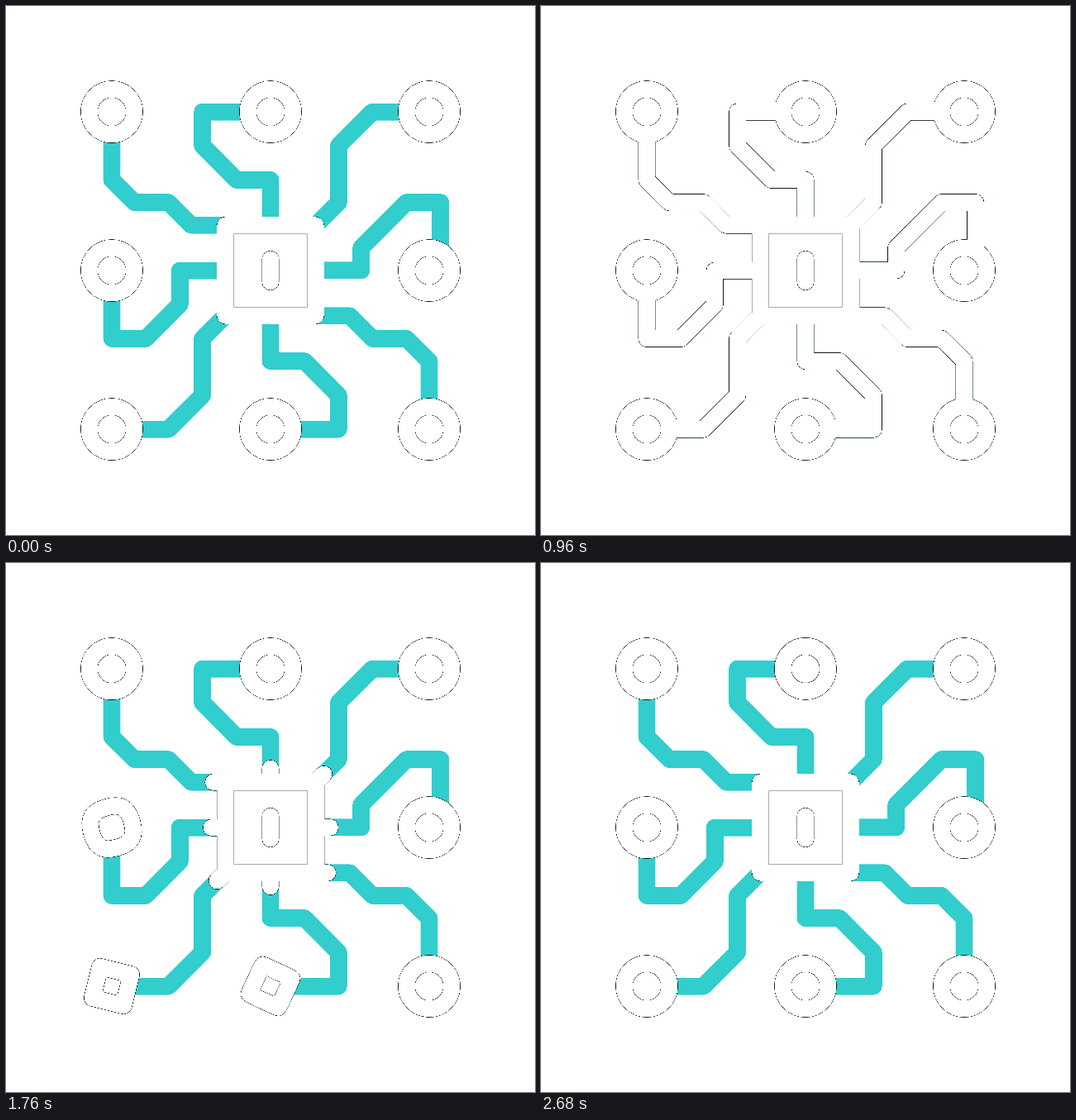
Write an HTML page that moves like this. It is 640x640 px and loops after 3.02 s.

```html
<!DOCTYPE html>
<html lang="en">
<head>
<meta charset="utf-8">
<title>Circuit</title>
<style>
  html, body { margin: 0; width: 100%; height: 100%; overflow: hidden; background: #fff; }
  svg { display: block; width: 100vw; height: 100vh; }
</style>
</head>
<body>
<svg viewBox="0 0 640 640">
  <defs>
    <!-- solid white body with a thin dark edge where coverage is partial -->
    <filter id="edge" filterUnits="userSpaceOnUse" x="0" y="0" width="640" height="640" color-interpolation-filters="sRGB">
      <feComponentTransfer in="SourceGraphic" result="body">
        <feFuncA type="linear" slope="5" intercept="-2"/>
      </feComponentTransfer>
      <feComponentTransfer in="SourceAlpha" result="rim">
        <feFuncA type="table" tableValues="0 .35 .6 .8 .9 .9 .7 0 0 0 0"/>
      </feComponentTransfer>
      <feMerge>
        <feMergeNode in="body"/>
        <feMergeNode in="rim"/>
      </feMerge>
    </filter>
    <filter id="crisp" filterUnits="userSpaceOnUse" x="0" y="0" width="640" height="640" color-interpolation-filters="sRGB">
      <feComponentTransfer>
        <feFuncA type="linear" slope="2.5"/>
      </feComponentTransfer>
    </filter>
  </defs>
  <g fill="none" stroke-linejoin="round">
    <g id="wires" stroke="#32cdcd" stroke-width="20.25" filter="url(#crisp)"/>
    <g id="lines" stroke="#fff" stroke-width="20.25" stroke-linecap="round" filter="url(#edge)"/>
    <path id="sides" d="M255.5 275V310M255.5 330V371M385.5 269V310M385.5 330V365" stroke="#aaa"/>
    <rect x="275.5" y="275.5" width="89" height="89" stroke="#aaa"/>
  </g>
</svg>
<script>
const LOOP = 3020, STEP = 20, MID = 320, U = 192 / 7;
const $ = id => document.getElementById(id);

function add(parent, d) {
  const p = document.createElementNS('http://www.w3.org/2000/svg', 'path');
  p.setAttribute('d', d);
  parent.appendChild(p);
  return p;
}

const at = v => MID + v * U;

// Follows compass steps such as "S2 SE1"; turn = -1 gives the half-turned copy
function route(x, y, steps, turn = 1) {
  let d = `M${at(x * turn)} ${at(y * turn)}`;
  for (const step of steps.split(' ')) {
    const [, dir, n] = step.match(/([NSEW]+)(.+)/);
    x += n * (dir.includes('E') - dir.includes('W'));
    y += n * (dir.includes('S') - dir.includes('N'));
    d += `L${at(x * turn)} ${at(y * turn)}`;
  }
  return d;
}

const paired = [
  [-7, -6, 'S2 SE1 E1.5 SE1 E1.5'],
  [-1, -7, 'W2 S1.5 SE1.5 E1.5 S2'],
  [6, -7, 'W1.5 SW1.5 S2.5 SW1']
];
const routes = [
  ...paired.flatMap(r => [route(...r), route(...r, -1)]),
  route(-7, 1, 'S2 E1.5 NE1.5 N1.5 E2'),
  route(7.5, -Math.sqrt(.75), 'N2.134 W1.5 SW2 S1 W2')
];

const pulses = routes.map(d => {
  add($('wires'), d);
  const el = add($('lines'), d);
  return { el, len: el.getTotalLength() };
});

add($('lines'), route(-2, -2, 'E4 S4 W4 N4') + 'Z').setAttribute('stroke-width', 19.72);
add($('lines'), route(0, -.5, 'S1'));

// Eight nodes, anticlockwise from the top left, spinning one after another
const nodes = Array.from({ length: 8 }, (_, i) => {
  const a = (5 - i) * Math.PI / 4;
  return {
    el: add($('lines'), ''),
    x: at(7 * Math.round(Math.cos(a))),
    y: at(7 * Math.round(Math.sin(a))),
    mid: 1493 + 125 * i
  };
});

// Four corners on a circle; round = 1 gives the circle, 0 the square
function blob(round) {
  const c = U * Math.SQRT1_2, q = c * .5523 * round;
  let d = `M${-c} ${-c}`;
  let side = [[-c + q, -c - q], [c - q, -c - q], [c, -c]];
  for (let i = 0; i < 4; i++) {
    d += 'C' + side.map(p => p.join(' ')).join(' ');
    side = side.map(([x, y]) => [-y, x]);
  }
  return d + 'Z';
}

const clamp = v => Math.max(0, Math.min(1, v));
const span = (t, a, b) => clamp((t - a) / (b - a));
const smooth = v => v * v * (3 - 2 * v);

// Timing curve with control points (a, 0) and (b, 1)
function ease(x, a, b) {
  if (x <= 0 || x >= 1) return x;
  let lo = 0, hi = 1;
  for (let i = 0; i < 24; i++) {
    const s = (lo + hi) / 2, r = 1 - s;
    if (3 * a * s * r * r + 3 * b * s * s * r + s * s * s < x) lo = s; else hi = s;
  }
  return smooth(lo);
}

function draw(t) {
  const head = ease(span(t, 360, 938), .6, .4);
  const tail = ease(span(t, 898, 2306), .2, 0);
  const live = head > 0 && tail < 1;
  for (const { el, len } of pulses) {
    el.style.display = live ? '' : 'none';
    el.setAttribute('stroke-dasharray', `${len * (head - tail)} ${len * 2}`);
    el.setAttribute('stroke-dashoffset', -len * tail);
  }
  $('sides').style.display = live && head === 1 ? '' : 'none';

  for (const { el, x, y, mid } of nodes) {
    const dt = t - mid;
    const square = smooth(span(dt, -230, -95)) - smooth(span(dt, 30, 200));
    const angle = 180 * ease(span(dt, -310, 310), .65, .35);
    el.setAttribute('d', blob(1 - square));
    el.setAttribute('transform', `translate(${x} ${y}) rotate(${angle})`);
  }
}

const start = performance.now();
function tick() {
  const t = (performance.now() - start) % LOOP;
  draw(Math.floor(t / STEP) * STEP);
  requestAnimationFrame(tick);
}
tick();
</script>
</body>
</html>
```
